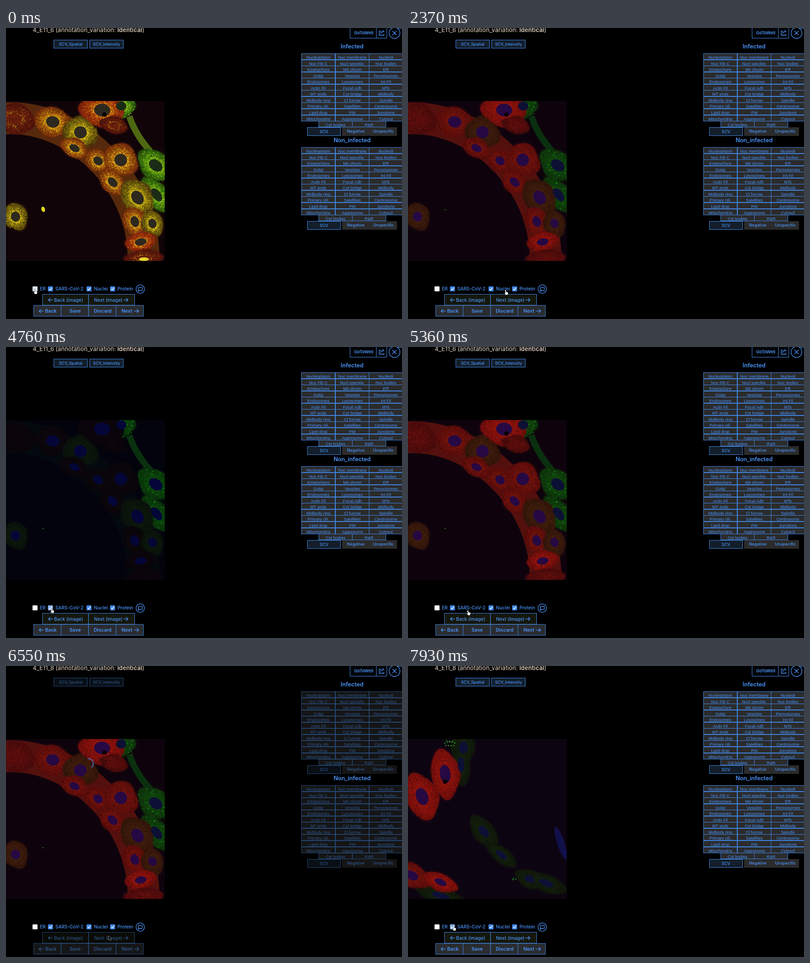
Recreate the animation shown at these times as an HTML page with a canvas. Size 873x642 px, loop 8 s.

```html
<!DOCTYPE html>
<html lang="en">
<head>
<meta charset="utf-8">
<title>Cell annotation</title>
<style>
html, body { margin: 0; width: 100%; height: 100%; overflow: hidden; background: #000; }
canvas { display: block; }
</style>
</head>
<body>
<canvas id="stage" width="873" height="642"></canvas>
<script>
const ctx = document.getElementById('stage').getContext('2d');
const BLUE = '#4b93f7', LINE = '#4085e2', LOOP = 8000, TURN = Math.PI * 2;
const IMG = { y: 161, w: 350, h: 353 };

// ---------- microscopy pictures ----------
function seeded(seed) {
  return () => {
    seed = (seed * 1664525 + 1013904223) >>> 0;
    return seed / 4294967296;
  };
}

const rgb = (r, g, b) => `rgb(${r | 0},${g | 0},${b | 0})`;

function oval(g, x, y, rx, ry, turn, color) {
  g.fillStyle = color;
  g.beginPath();
  g.ellipse(x, y, rx, ry, turn, 0, TURN);
  g.fill();
}

// Strength of each stain by kind of cell.
const KINDS = {
  red: { red: .78, green: .04, er: .5 },
  bright: { red: 1, green: .02, er: .3 },
  bare: { red: .62, green: .02, er: .12, empty: true },
  mixed: { red: .4, green: .25, er: .62 },
  green: { red: .04, green: .8, er: .5 },
  faint: { red: .06, green: .32, er: 0 }
};

// Cells lie along the tissue, so their lean follows from their height.
function picture(scene, lean, on, ground) {
  const layer = document.createElement('canvas');
  layer.width = IMG.w;
  layer.height = IMG.h;
  const g = layer.getContext('2d');
  const rand = seeded(41), nuclei = [];
  g.translate(0, -IMG.y);
  g.fillStyle = ground;
  g.fillRect(0, IMG.y, IMG.w, IMG.h);

  function cell(kind, x, y, along, across) {
    const { red, green, er, empty } = KINDS[kind];
    const r = on.red ? red : 0, e = on.er ? er : 0;
    const turn = lean((y - IMG.y) / IMG.h);
    const inner = [12 + r * 135 + e * 115, 5 + r * 14 + green * 85 + e * 150, 13];
    const outer = [10 + r * 100 + e * 45, 4 + r * 8 + green * 55 + e * 55, 11];
    const shade = g.createRadialGradient(0, 0, .4, 0, 0, 1.05);
    shade.addColorStop(0, rgb(...inner));
    shade.addColorStop(1, rgb(...outer));

    g.save();
    g.translate(x, y);
    g.rotate(turn);
    g.scale(along, across);
    g.beginPath();
    for (let a = 0; a < TURN; a += .1) {
      const reach = 1 + .05 * Math.sin(3 * a + x) + .05 * Math.cos(4 * a);
      g.lineTo(reach * Math.cos(a), reach * Math.sin(a));
    }
    g.fillStyle = shade;
    g.shadowColor = rgb(...outer);
    g.shadowBlur = 5;
    g.fill();
    g.shadowBlur = 0;

    const grain = (color, reach, size) => {
      const a = rand() * TURN;
      g.fillStyle = color;
      g.fillRect(reach * Math.cos(a), reach * Math.sin(a), size / along, size / across);
    };
    const area = along * across;
    for (let i = area * .9; i > 0; i--) {
      grain(i % 2 < 1 ? 'rgba(10,0,5,.33)' : rgb(...inner.map(v => v * (.75 + rand() * .4))), Math.sqrt(rand()), 1.3);
    }
    for (let i = area * e * .6; i > 0; i--) {
      grain(red > .3 ? 'rgba(235,200,25,.6)' : 'rgba(165,200,30,.6)', .38 + .6 * rand() * rand(), 1.5);
    }
    if (green > .6) for (let i = 0; i < 25; i++) grain(e ? '#b9e62f' : '#23b627', Math.sqrt(rand()), 1.6);
    g.restore();

    const core = e ? (green > .6 ? '#1b2c16' : '#2d291f')
      : r > .3 ? '#260943' : r ? '#0d1035' : '#040638';
    if (!empty) nuclei.push([x, y, along * .37, across * .39, turn, core]);
  }
  scene(g, cell, on);
  nuclei.forEach(n => oval(g, ...n));
  if (on.red) oval(g, ...scene.hole, 5, 5, 0, '#080204');
  return layer;
}

function strand(g, width, color, draw) {
  g.lineWidth = width;
  g.strokeStyle = color;
  g.beginPath();
  draw();
  g.stroke();
}

function cluster(g, cell, on) {
  strand(g, 70, on.er ? '#57290c' : on.red ? '#54100d' : '#03090e', () => {
    g.moveTo(-10, 200);
    g.bezierCurveTo(140, 185, 310, 330, 303, 520);
  });
  strand(g, 14, on.er ? '#4e6812' : '#0a300f', () => {
    g.moveTo(272, 195);
    g.quadraticCurveTo(285, 235, 318, 272);
  });
  cell('green', 254, 172, 30, 26);
  cell('green', 330, 303, 44, 30);
  cell('green', 332, 368, 44, 24);
  cell('bare', 18, 200, 46, 32);
  cell('red', 103, 207, 40, 32);
  cell('mixed', 164, 230, 38, 34);
  cell('red', 151, 265, 32, 20);
  cell('bright', 212, 181, 48, 36);
  cell('bare', 238, 214, 30, 18);
  cell('red', 203, 293, 30, 23);
  cell('red', 253, 291, 38, 35);
  cell('red', 235, 340, 34, 22);
  cell('mixed', 290, 374, 44, 32);
  cell('red', 284, 427, 33, 24);
  cell('mixed', 323, 431, 29, 23);
  cell('bright', 297, 472, 21, 33);
  cell('bare', 305, 507, 17, 42);
  cell('mixed', 21, 416, 30, 26);
  if (on.er) {
    oval(g, 82, 400, 4, 6, -.3, '#dfd51b');
    oval(g, 304, 510, 11, 4, 0, '#e2d42a');
  } else {
    oval(g, 82, 401, 1.5, 1, 0, '#299021');
  }
}
cluster.hole = [217, 191];

function sparse(g, cell) {
  cell('faint', 122, 180, 36, 25);
  cell('faint', 117, 218, 46, 19);
  cell('bright', 82, 238, 54, 30);
  cell('bright', 31, 288, 52, 34);
  cell('faint', 167, 365, 40, 22);
  cell('faint', 206, 417, 40, 16);
  cell('faint', 268, 470, 32, 19);
  cell('faint', 305, 479, 46, 18);
  cell('faint', 72, 507, 54, 18);
  cell('red', 8, 462, 42, 25);
  cell('bright', 72, 477, 38, 18);
  oval(g, 337, 391, 8, 38, -.32, '#11104a');
  for (let i = 0; i < 12; i++) oval(g, 81 + i * 2, 170 + Math.sin(i * 2) * 6, 1.4, 1.1, 0, '#25c92a');
  for (let i = 0; i < 6; i++) oval(g, 234 + Math.cos(i * 2) * 4, 470 + Math.sin(i * 3) * 3, 1, 1, 0, '#209622');
}
sparse.hole = [82, 255];

const downhill = k => k * 1.57, uphill = k => 1.75 - k * 1.5;
const views = {
  all: picture(cluster, downhill, { red: true, er: true }, '#100408'),
  noEr: picture(cluster, downhill, { red: true }, '#0e030c'),
  noRed: picture(cluster, downhill, {}, '#02030c'),
  next: picture(sparse, uphill, { red: true }, '#0d0411')
};

// ---------- interface ----------
const SANS = 'Inter, sans-serif', TABLE = '"Liberation Sans", Arial, sans-serif';

function text(str, x, y, size, { weight = 500, color = BLUE, align = 'center', family = SANS } = {}) {
  ctx.font = `${weight} ${size}px ${family}`;
  ctx.textAlign = align;
  ctx.textBaseline = 'middle';
  ctx.fillStyle = color;
  ctx.fillText(str, x, y);
  return ctx.measureText(str).width;
}

function box(x, y, w, h, fill, line = LINE) {
  ctx.fillStyle = fill;
  ctx.fillRect(x, y, w, h);
  if (!line) return;
  ctx.strokeStyle = line;
  ctx.lineWidth = 1;
  ctx.strokeRect(x, y, w, h);
}

function path(points, color = BLUE, width = 1.3) {
  ctx.strokeStyle = color;
  ctx.lineWidth = width;
  ctx.beginPath();
  points.forEach(p => ctx.lineTo(...p));
  ctx.stroke();
}

function arc(x, y, r, from = 0, to = TURN) {
  ctx.strokeStyle = BLUE;
  ctx.lineWidth = 1.3;
  ctx.beginPath();
  ctx.arc(x, y, r, from, to);
  ctx.stroke();
}

function arrow(x, y, dir, color = BLUE) {
  path([[x - 5 * dir, y], [x + 5 * dir, y]], color);
  path([[x + dir, y - 4], [x + 5 * dir, y], [x + dir, y + 4]], color);
}

const organelles = [
  'Nucleoplasm', 'Nuc membrane', 'Nucleoli', 'Nuc Fib C', 'Nucl speckle.', 'Nuc bodies',
  'Kinetochore', 'Mit chrom', 'ER', 'Golgi', 'Vesicles', 'Peroxisomes',
  'Endosomes', 'Lysosomes', 'Int Fil', 'Actin Fil', 'Focal Adh', 'MTs',
  'MT ends', 'Cyt bridge', 'Midbody', 'Midbody ring', 'Cl furrow', 'Spindle',
  'Primary cili.', 'Satellites', 'Centrosome', 'Lipid drop', 'PM', 'Junctions',
  'Mitochondria', 'Aggresome', 'Cytosol'];

function tableCell(label, x, y) {
  box(x, y, 74, 13, '#2b2b2c');
  text(label, x + 37, y + 8.5, 9.2, { weight: 400, family: TABLE });
}

function panel(title, top, dim) {
  text(title, 763, top + 41, 12.7, { weight: 600 });
  ctx.globalAlpha = dim;
  organelles.forEach((name, i) =>
    tableCell(name, 651.5 + Math.round(i % 3 * 74.5), top + 56.5 + Math.round(Math.floor(i / 3) * 13.55)));
  tableCell('Cyt bodies', 689.5, top + 205.5);
  tableCell('R&R', 763.5, top + 205.5);
  box(741, top + 219, 121, 19, '#2b2b2c', null);
  box(664.5, top + 219.5, 73, 18, '#131e2a');
  text('SCV', 701, top + 229.5, 9);
  text('Negative', 771, top + 228.5, 9);
  text('Unspecific', 832, top + 228.5, 9);
  ctx.globalAlpha = 1;
}

function header(slide, dim) {
  const style = { color: '#cabdad', align: 'left' };
  const start = 59 + text(slide + ' (annotation_variation: ', 59, 5.5, 12.9, style);
  const end = start + text('Identical', start, 5.5, 13, { ...style, weight: 700 });
  text(')', end, 5.5, 12.9, style);
  ctx.globalAlpha = dim;
  box(105.5, 26.5, 74, 18, '#131e2a');
  box(184.5, 26.5, 74, 18, '#131e2a');
  text('SCV_Spatial', 142.5, 36, 9);
  text('SCV_Intensity', 221.5, 36, 9);
  ctx.globalAlpha = 1;
  box(758.5, -2, 58, 24.5, '#030507');
  box(816.5, -2, 23, 24.5, '#030507');
  text('GoToWell', 788.5, 11.5, 9.4, { weight: 600 });
  path([[826, 7], [823, 7], [823, 16], [833, 16], [833, 13]]);
  path([[826, 13], [827, 9], [833, 8], [830, 5]]);
  arc(856.5, 11, 12);
  for (const side of [-4.5, 4.5]) path([[856.5 - side, 6.5], [856.5 + side, 15.5]], BLUE, 1.5);
  for (let x = 863; x < 873; x += 4) oval(ctx, x, .5, 1.3, 1.3, 0, BLUE);
}

function check(x, label, checked, hover) {
  ctx.fillStyle = checked ? (hover ? '#8db5ee' : '#4189ee') : (hover ? '#dce5ef' : '#fff');
  ctx.beginPath();
  ctx.roundRect(x - 5.5, 570, 11, 11, 1.5);
  ctx.fill();
  if (checked) path([[x - 3, 575.7], [x - .8, 578], [x + 3.2, 573]], '#fff', 1.5);
  text(label, x + 10.7, 576, 10.2, { align: 'left' });
}

function footer(t, dim, hover) {
  check(64, 'ER', false, t < 150 || hover === 'er');
  check(98, 'SARS-CoV-2', t < 3720 || t >= 4460, (t >= 3720 && t < 5360) || t >= 7930);
  check(183, 'Nuclei', true);
  check(235, 'Protein', true);
  arc(296, 576, 9.3);
  ctx.strokeRect(292, 572.5, 8.5, 6.5);
  path([[292, 578], [292, 581], [295, 579]], BLUE, 1.1);

  ctx.globalAlpha = dim;
  const lit = hover === 'next' && dim === 1;
  const nextColor = lit ? '#d3e0f3' : BLUE;
  box(80.5, 587.5, 101.5, 24, '#15170d');
  box(182, 587.5, 101.5, 24, lit ? '#606163' : '#15170d');
  arrow(98.5, 600, -1);
  text('Back (image)', 138, 600.5, 10.2);
  text('Next (image)', 225.5, 600.5, 10.2, { color: nextColor });
  arrow(264, 600, 1, nextColor);
  ['Back', 'Save', 'Discard', 'Next'].forEach((label, i) => {
    const x = 61 + i * 60.5;
    const shift = { Back: 7, Next: -7 }[label] || 0;
    box(x, 612, 60.5, 24, label === 'Discard' && hover === 'discard' ? '#5d6064' : '#2a2c30');
    text(label, x + 31 + shift, 624.5, 10.6, { weight: 600 });
    if (shift) arrow(x + 31 - 2 * shift, 624.5, -Math.sign(shift));
  });
  ctx.globalAlpha = 1;
}

// ---------- pointer ----------
const STEP = 150;
const stops = [
  [1040, 62, 576], [1490, 208, 601], [2220, 232, 578], [3270, 104, 576], [3420, 64, 575],
  [3720, 99, 576], [5210, 99, 576], [5810, 226, 595], [7330, 226, 595], [7930, 99, 573]
];

function pointerAt(t) {
  const i = stops.findIndex(s => s[0] > t);
  if (i < 1) return stops.at(i).slice(1);
  const [a, x, y] = stops[i - 1], [b, toX, toY] = stops[i];
  const k = Math.floor((t - a) / STEP) * STEP / (b - a);
  return [x + (toX - x) * k, y + (toY - y) * k];
}

function pointer(isArrow, [x, y]) {
  const shape = isArrow
    ? [[0, 0], [0, 9], [2, 7], [4, 11], [5.5, 10], [4, 7], [6.5, 6.5]]
    : [[0, 1], [1.5, 0], [3, 5], [6, 5], [7, 7], [5.5, 11], [2, 11], [-1, 7], [1.3, 7]];
  ctx.beginPath();
  shape.forEach(p => ctx.lineTo(x + p[0], y + p[1]));
  ctx.closePath();
  ctx.fillStyle = isArrow ? '#000' : '#fff';
  ctx.strokeStyle = isArrow ? '#fff' : '#111';
  ctx.lineWidth = .9;
  ctx.stroke();
  ctx.fill();
}

function hoverAt(t) {
  if (t >= 1340 && t < 1640) return 'discard';
  if ((t >= 1640 && t < 2080) || (t >= 5660 && t < 7480)) return 'next';
  return t >= 3420 && t < 3570 ? 'er' : '';
}

function viewAt(t) {
  if (t < 150) return views.all;
  if (t >= 6730) return views.next;
  return t >= 4010 && t < 5060 ? views.noRed : views.noEr;
}

function draw(t) {
  const loading = t >= 6400 && t < 6730;
  const dim = loading ? .5 : 1;
  ctx.fillStyle = '#000';
  ctx.fillRect(0, 0, 873, 642);
  ctx.drawImage(viewAt(t), 0, IMG.y);
  header(t < 6400 ? '4_E11_6' : '4_E11_8', dim);
  panel('Infected', 0, dim);
  panel('Non_infected', 207, dim);
  footer(t, dim, hoverAt(t));
  if (loading) {
    const turn = (t - 6550) / 500 * TURN;
    arc(182, 215, 10.5, turn - 1.75, turn + .95);
  }
  pointer(t >= 6260 && t < 7480, pointerAt(t));
}

const began = performance.now();
function tick() {
  draw((performance.now() - began) % LOOP);
  requestAnimationFrame(tick);
}
tick();
</script>
</body>
</html>
```
